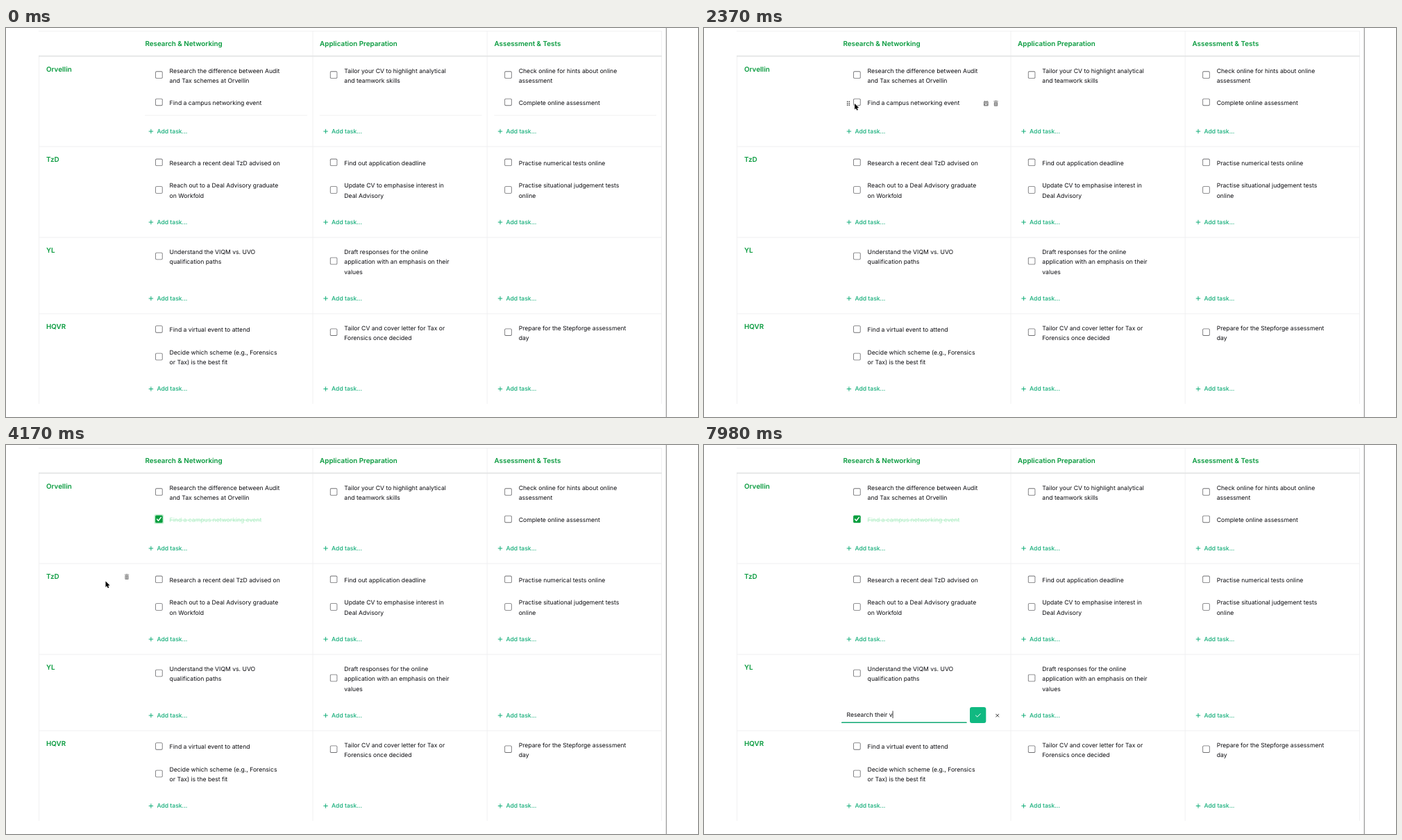
Recreate the animation shown at these times as an HTML page with a canvas. Size 997 px wide and 561 px high, loop 8 s.

```html
<!DOCTYPE html>
<html lang="en">
<head>
<meta charset="utf-8">
<title>Application planner</title>
<style>
  html, body { margin: 0; width: 100%; height: 100%; overflow: hidden; background: #fff; }
  canvas { display: block; width: 997px; height: 561px; }
</style>
</head>
<body>
<canvas id="stage" width="997" height="561"></canvas>
<script>
const ctx = document.getElementById('stage').getContext('2d');
const LOOP = 8000, CLICK_TASK = 2980, CLICK_ADD = 5070, TYPE_START = 6150, TYPE_STEP = 118;
const GREEN = '#079a3d', TEAL = '#10b981', INK = '#0b0b0f';
const BODY = '8.63px Inter, sans-serif';
const MEDIUM = '500 8.58px Inter, sans-serif';
const HEADING = '600 9.84px Inter, sans-serif';
const TYPED = 'Research their v';

const columns = [
  { dx: 0, title: 'Research & Networking' },
  { dx: 251.7, title: 'Application Preparation' },
  { dx: 503.1, title: 'Assessment & Tests' }
];
const rows = [
  { name: 'Orvellin', top: 41, add: 149, bottom: 171 },
  { name: 'TzD', top: 171, add: 280, bottom: 302 },
  { name: 'YL', top: 302, add: 390, bottom: 412 },
  { name: 'HQVR', top: 412, add: 520.5, bottom: 542 }
];
const task = (col, y, ...lines) => ({ dx: columns[col].dx, y, lines });
const campus = task(0, 107.7, 'Find a campus networking event');
const tasks = [
  task(0, 61.4, 'Research the difference between Audit', 'and Tax schemes at Orvellin'),
  campus,
  task(0, 194.6, 'Research a recent deal TzD advised on'),
  task(0, 227.3, 'Reach out to a Deal Advisory graduate', 'on Workfold'),
  task(0, 322.8, 'Understand the VIQM vs. UVO', 'qualification paths'),
  task(0, 435.2, 'Find a virtual event to attend'),
  task(0, 467.8, 'Decide which scheme (e.g., Forensics', 'or Tax) is the best fit'),
  task(1, 61.4, 'Tailor your CV to highlight analytical', 'and teamwork skills'),
  task(1, 194.6, 'Find out application deadline'),
  task(1, 227.3, 'Update CV to emphasise interest in', 'Deal Advisory'),
  task(1, 322.8, 'Draft responses for the online', 'application with an emphasis on their', 'values'),
  task(1, 432.5, 'Tailor CV and cover letter for Tax or', 'Forensics once decided'),
  task(2, 61.4, 'Check online for hints about online', 'assessment'),
  task(2, 107.7, 'Complete online assessment'),
  task(2, 194.6, 'Practise numerical tests online'),
  task(2, 227.3, 'Practise situational judgement tests', 'online'),
  task(2, 432.5, 'Prepare for the Stepforge assessment', 'day')
];
// Pointer stops: time, x, y
const stops = [
  [1900, 300, 568], [2340, 217, 109], [2730, 217, 109], [2900, 219.5, 108.3],
  [3530, 219.5, 108.3], [4120, 143.5, 196.5], [4350, 143.5, 197], [5020, 239, 390.5]
];

const clamp = v => Math.max(0, Math.min(1, v));
const smooth = v => v * v * (3 - 2 * v);
const mix = (a, b, p) => `rgb(${a.map((v, i) => Math.round(v + (b[i] - v) * p))})`;

function text(str, x, y, font, color) {
  ctx.font = font;
  ctx.fillStyle = color;
  ctx.fillText(str, x, y + 3.1);
}

function rect(x, y, w, h, color) {
  ctx.fillStyle = color;
  ctx.fillRect(x, y, w, h);
}

function rounded(x, y, w, h, r, color) {
  ctx.fillStyle = color;
  ctx.beginPath();
  ctx.roundRect(x, y, w, h, r);
  ctx.fill();
}

function poly(points, color, width) {
  ctx.strokeStyle = color;
  ctx.lineWidth = width;
  ctx.beginPath();
  points.forEach(([x, y]) => ctx.lineTo(x, y));
  ctx.stroke();
}

function pointerAt(t) {
  if (t < stops[0][0] || t >= TYPE_START) return null;
  const next = stops.findIndex(s => s[0] > t);
  if (next < 0) return { x: 239, y: 390.5 };
  const [t0, x0, y0] = stops[next - 1], [t1, x1, y1] = stops[next];
  const p = smooth((t - t0) / (t1 - t0));
  return { x: x0 + (x1 - x0) * p, y: y0 + (y1 - y0) * p };
}

function drawGrid(t) {
  rect(47, 4, 897, 1, '#f1f1f2');
  [47, 441.5, 692.7, 944].forEach((x, i) => rect(x, i ? 4 : 41, 1, i ? 538 : 501, '#f1f1f2'));
  rows.slice(1).forEach(r => rect(47, r.top - .5, 898, 1, '#f0f0f1'));
  rect(47, 39.7, 898, 1.7, '#e2e3e4');
  rect(950.8, 0, 1, 561, '#818181');
  if (t < 450) columns.forEach(c => rect(200 + c.dx, 125.5, 234, 1, '#f1f1f2'));
}

function drawTrash(x, y, color) {
  rect(x - 3.2, y - 3.5, 6.4, 1, color);
  rect(x - 1.2, y - 4.1, 2.4, 1, color);
  rounded(x - 2.7, y - 2, 5.4, 6, 1, color);
  [-1.2, 0, 1.2].forEach(d => rect(x + d - .2, y - 1, .4, 4, '#ddd'));
}

function drawTaskTools(item) {
  const x = item.dx, y = item.y + (item.lines.length - 1) * 7.1 + 1;
  for (let i = 0; i < 6; i++) {
    rect(205.9 + x + (i % 2) * 2.7, y - 3.2 + Math.floor(i / 2) * 2.5, 1.5, 1.5, '#444');
  }
  rounded(402.9 + x, y - 3, 6.8, 6.8, 1, '#858585');
  rect(404.2 + x, y - 4, 1, 2, '#858585');
  rect(407.4 + x, y - 4, 1, 2, '#858585');
  rect(403.7 + x, y - 1, 5.2, .7, '#fff');
  rect(405 + x, y + 1, 2.6, 1.2, '#fff');
  drawTrash(420.5 + x, y, '#858585');
}

function drawCheckbox(x, y) {
  rounded(x - 5.25, y - 5.25, 10.5, 10.5, 1.7, '#6f6f72');
  rounded(x - 4.4, y - 4.4, 8.8, 8.8, 1, '#fff');
}

function drawChecked(x, y, t) {
  const pulse = Math.sin(Math.PI * clamp((t - CLICK_TASK) / 400));
  const r = 5.3 + pulse * .5;
  if (t < CLICK_ADD) rounded(x - r - 1.6, y - r - 1.6, 2 * r + 3.2, 2 * r + 3.2, 2.6, '#c5efd2');
  rounded(x - r, y - r, 2 * r, 2 * r, 1.5, mix([7, 158, 62], [10, 110, 52], pulse));
  poly([[x - 2.8, y + .2], [x - .9, y + 2.3], [x + 2.9, y - 2.5]], '#fff', 1.5);
}

function drawDoneText(item, t) {
  const fade = clamp((t - CLICK_TASK) / 140);
  const settle = clamp((t - CLICK_TASK - 140) / 380);
  const color = settle
    ? mix([136, 144, 139], [174, 237, 196], smooth(settle))
    : mix([11, 11, 15], [136, 144, 139], fade);
  const scale = 1 + .021 * Math.sin(Math.PI * clamp((t - CLICK_TASK) / 340));
  ctx.save();
  ctx.translate(301.5, item.y);
  ctx.scale(scale, scale);
  ctx.translate(-301.5, -item.y);
  text(item.lines[0], 235.6, item.y, BODY, color);
  rect(235.6, item.y + .1, ctx.measureText(item.lines[0]).width * fade, .8, color);
  ctx.restore();
}

function drawTask(item, t, pointer) {
  const x = 220.4 + item.dx, n = item.lines.length, boxY = item.y + (n - 1) * 7 - .8;
  const hovered = pointer && pointer.x > 200 + item.dx && pointer.x < 434 + item.dx &&
    pointer.y > item.y - 10 && pointer.y < item.y + (n - 1) * 14.3 + 10;
  if (hovered) drawTaskTools(item);
  if (item === campus && t >= CLICK_TASK) {
    drawChecked(x, boxY, t);
    drawDoneText(item, t);
    return;
  }
  drawCheckbox(x, boxY);
  item.lines.forEach((line, i) => text(line, 235.6 + item.dx, item.y + i * 14.3, BODY, INK));
}

function drawAddLink(x, y) {
  rect(205.7 + x, y - .45, 6.4, 1, '#12ad78');
  rect(208.4 + x, y - 3.2, 1, 6.4, '#12ad78');
  text('Add task...', 217.4 + x, y - .3, MEDIUM, '#12ad78');
}

function drawInput(t) {
  const count = Math.max(0, Math.min(TYPED.length, Math.floor((t - TYPE_START) / TYPE_STEP) + 1));
  const value = TYPED.slice(0, count);
  rounded(198, 399.6, 180.7, 1.5, .7, '#0fa873');
  text(value || 'Add task', 205.5, 389.1, BODY, count ? INK : '#5c5f66');
  const caretX = 205.5 + (count ? ctx.measureText(value).width : 0);
  const blink = count || (t - CLICK_ADD) % 1000 < 500;
  if (blink) rect(caretX, 383.5, .9, 10.5, '#222');
  rounded(383, 378, 23.3, 23, 3, TEAL);
  poly([[391.5, 390], [393.7, 392.1], [398.2, 387.6]], '#fff', 1);
  poly([[420.7, 388.1], [424.7, 392.1]], '#333', 1);
  poly([[424.7, 388.1], [420.7, 392.1]], '#333', 1);
}

function drawPointer({ x, y }, t) {
  if (t >= CLICK_ADD) {
    rect(x - .6, y - 4.5, 1.2, 10, '#000');
    rect(x - 2, y - 5, 4, .9, '#000');
    rect(x - 2, y + 5, 4, .9, '#000');
    return;
  }
  ctx.save();
  ctx.translate(x, y);
  ctx.beginPath();
  [[0, 0], [0, 8.4], [1.9, 6.7], [3.2, 9.8], [4.8, 9.1], [3.5, 6.2], [6.1, 6]]
    .forEach(([px, py]) => ctx.lineTo(px, py));
  ctx.closePath();
  ctx.strokeStyle = '#fff';
  ctx.lineWidth = 1.4;
  ctx.stroke();
  ctx.fillStyle = '#000';
  ctx.fill();
  ctx.restore();
}

function draw(t) {
  const pointer = pointerAt(t);
  rect(0, 0, 997, 561, '#fff');
  drawGrid(t);
  columns.forEach(c => text(c.title, 200.4 + c.dx, 22.6, HEADING, GREEN));
  rows.forEach((row, r) => {
    text(row.name, 58, row.top + 18.4, HEADING, GREEN);
    if (pointer && pointer.x > 47 && pointer.x < 197 && pointer.y > row.top && pointer.y < row.bottom) {
      drawTrash(174, row.top + 19, '#909090');
    }
    columns.forEach((c, i) => {
      if (r === 2 && i === 0 && t >= CLICK_ADD) drawInput(t);
      else drawAddLink(c.dx, row.add);
    });
  });
  tasks.forEach(item => drawTask(item, t, pointer));
  if (pointer) drawPointer(pointer, t);
}

function tick() {
  draw(performance.now() % LOOP);
  requestAnimationFrame(tick);
}

ctx.textRendering = 'geometricPrecision';
ctx.lineCap = 'round';
ctx.lineJoin = 'round';
tick();
</script>
</body>
</html>
```
